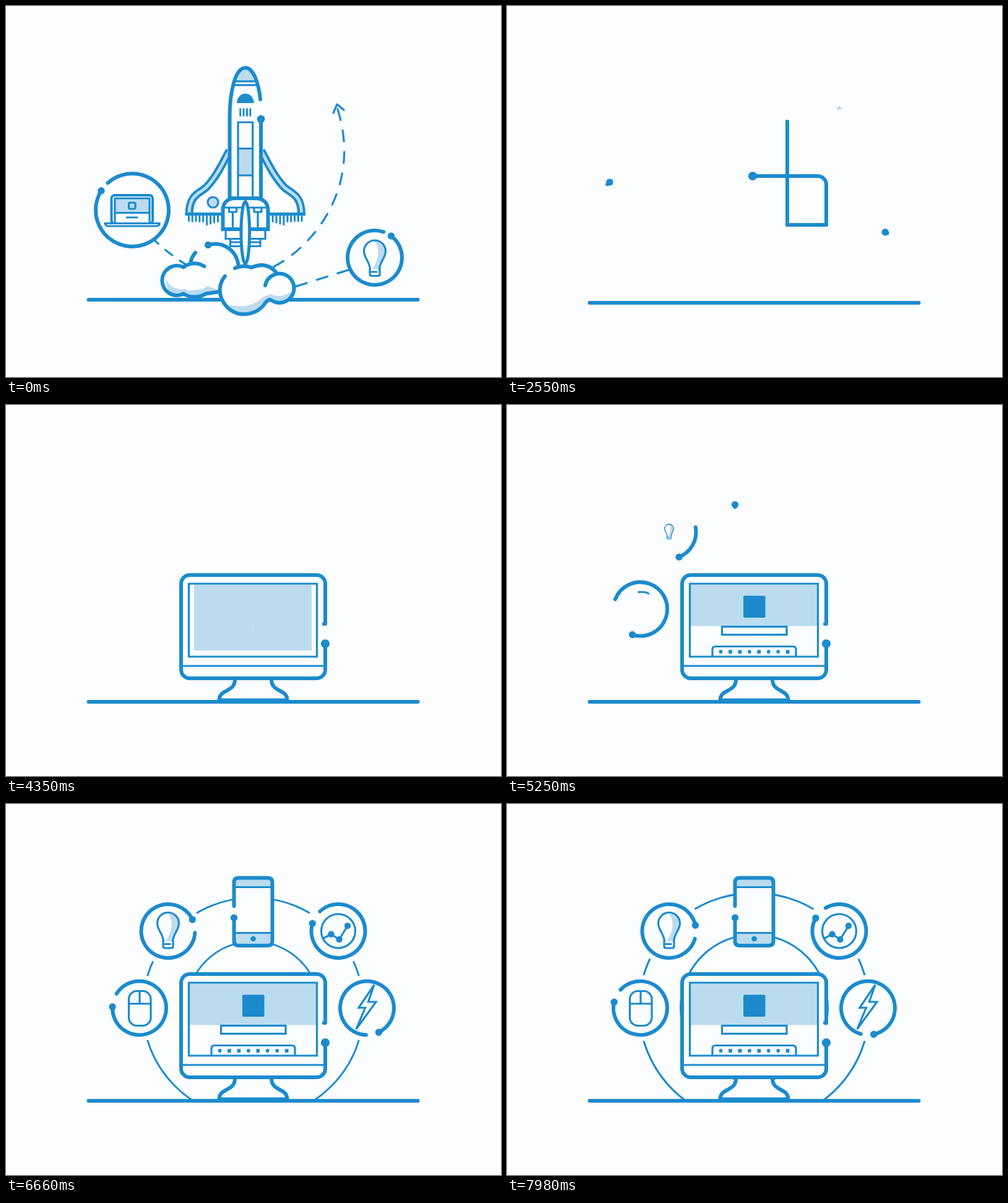
Animation, 800 px wide and 600 px high, one loop 8 s. Source, as an HTML page:

```html
<!DOCTYPE html>
<html lang="en">
<head>
<meta charset="utf-8">
<title>Launch to desktop</title>
<style>
  html, body { margin: 0; width: 100%; height: 100%; overflow: hidden; background: #fcfdff; }
  svg { display: block; width: 100vw; height: 100vh; }
  .k, .t { fill: none; stroke: #1b8bcd; }
  .k { stroke-width: 6; stroke-linecap: round; stroke-linejoin: round; }
  .t { stroke-width: 3.2; }
  .r { stroke-linecap: round; stroke-linejoin: round; }
  .d { fill: #1b8bcd; }
  .l { fill: #bbdcef; }
  .w { fill: #fcfdff; }
</style>
</head>
<body>
<svg viewBox="0 0 800 600">
  <defs>
    <clipPath id="above"><rect width="800" height="479"/></clipPath>
    <g id="bulb">
      <path class="l" d="M0-28Q13-8-4 17L8 17C8 4 17-2 17-12Q17-26 0-28Z"/>
      <path class="t r" d="M-7.5 17C-8.5 4-17.5-1-17.5-12A17.5 17.5 0 0 1 17.5-12C17.5-1 8.5 4 7.5 17"/>
      <path class="t r" d="M-8 16.500V25Q-8 28-5 28H5Q8 28 8 25V16.500M-5 21.500H3"/>
    </g>
    <g id="wing">
      <path class="k" style="stroke-width:13;stroke-linecap:butt" d="M361 234C350 255 340 276 324 293C312 304 296 305 296 338"/>
      <path class="k" style="stroke:#bbdcef;stroke-width:5;stroke-linecap:butt" d="M361 234C350 255 340 276 324 293C312 304 296 305 296 336"/>
      <path class="k" style="stroke-width:5;stroke-linecap:butt" d="M289.500 336.500H352"/>
      <path class="t r" style="stroke-width:3" d="M295.500 338v9.500M301.200 338v10M307 338v9.500M312.800 338v10.500M318.600 338v10.500M324.600 338v15.500M330.500 338v14M336.500 338v12M342.500 338v10.500"/>
    </g>
  </defs>

  <g id="arcs" clip-path="url(#above)">
    <circle id="outer" class="t" cx="399.500" cy="330"/>
    <circle id="inner" class="t" cx="399.500" cy="330"/>
    <circle class="w" cx="262" cy="205.500" r="54.500"/>
    <circle class="w" cx="215.500" cy="330" r="53.500"/>
    <circle class="w" cx="537" cy="205.500" r="54.500"/>
    <circle class="w" cx="583.500" cy="330" r="53.500"/>
  </g>
  <path id="ground" class="k" d="M133.500 0H665.500"/>

  <g id="launch">
    <path id="dashA" class="t r" d="M536 167C575 290 500 388 430 423"/>
    <path id="tip" class="t r" d="M529 173L535 159L546 168"/>
    <path id="dashL" class="t r" d="M239 378Q262 400 292 419"/>
    <path id="dashB" class="t r" d="M553 427L467 454"/>
    <g id="laptop">
      <rect class="t" style="stroke-width:4" x="170.500" y="306" width="66.500" height="46" rx="5"/>
      <rect class="l" x="176" y="311" width="56" height="23"/>
      <path class="t" d="M176 351V311H232V351M176 334.500H232M194 342H213"/>
      <rect class="t" x="198.500" y="318" width="10.500" height="10" rx="2"/>
      <path class="t w" style="fill:#fcfdff" d="M160 351.500H248V353Q247 356 243 356H165Q161 356 160 351.500Z"/>
    </g>
    <g id="bulbA"><use href="#bulb" x="596" y="408.500"/></g>
    <g id="wings">
      <use href="#wing"/>
      <use href="#wing" transform="translate(773.500 0) scale(-1 1)"/>
      <circle class="t" style="fill:#bbdcef" cx="334.500" cy="317.500" r="8.500"/>
    </g>
    <path id="hull" class="w" d="M411 151C408 122 399 100 387 100C370 100 361.500 140 361.500 180V311H412V183Z"/>
    <g id="deck">
      <path class="l" d="M373 121C376 110 381 103 387 103C393 103 398 110 401 121Z"/>
      <path class="t" d="M370 121.800H403M369 127.800H405"/>
      <path class="d" d="M373 157A13.900 15.300 0 0 1 400.800 157Z"/>
      <path class="t" style="stroke-width:2.900" d="M378.700 165.500v13M384 165.500v13M389.500 165.500v13M394.800 165.500v13"/>
      <rect class="l" x="375" y="230" width="24" height="44"/>
      <path class="t" d="M375 311V188H398.700V311M375 230.500H398.700M375 274H398.700"/>
    </g>
    <path id="body" class="k" pathLength="1" d="M411 151C408 122 399 100 387 100C370 100 361.500 140 361.500 180V311H412V183"/>
    <g id="engine">
      <path class="t" style="fill:#fcfdff" d="M355 360H419V376.500H355ZM362.500 376.500H411V388.500H362.500ZM362.500 382H411"/>
      <path class="k" style="fill:#fcfdff;stroke-linejoin:miter" d="M350.500 361V331C350.500 317 359 311 371 311H402C415 311 423.500 317 423.500 331V361Z"/>
      <path class="t" d="M353 326H420M360.500 326V333H372.500V326M366.500 333V360M401 326V333H413V326M407 333V360"/>
      <ellipse class="k" style="fill:#fcfdff;stroke-width:5" cx="386.800" cy="366.500" rx="6.800" ry="50"/>
    </g>
    <g id="cloudL">
      <path class="w" d="M298 415Q310 382 337 384Q372 386 376 424L376 460H330Q305 476 287 465A24 24 0 1 1 287 422Z"/>
      <path class="l" d="M258 441Q266 460 290 458Q296 462 305 459Q318 459 326 453L345 460Q328 464 323 467Q305 474 287 465Q258 470 258 441Z"/>
      <path class="k" d="M306 399Q300 406 298.500 414M327 386.500C350 380 374 394 376 423M287 422.500A24 24 0 1 0 287 465.500M287 422Q304 411 320.500 421M287 465.500Q304 476 324 465Q332 464 345 462"/>
      <circle class="d" cx="326.700" cy="386.500" r="5.700"/>
    </g>
    <g id="cloudR">
      <path class="w" d="M354 437Q370 415 397 423Q424 411 438 433A24 24 0 1 1 424 476Q410 498 384 498A38 38 0 0 1 354 437Z"/>
      <path class="l" d="M353 482Q395 493 416 470L428 466Q444 474 463 461Q458 478 441 479Q428 478 422 476Q412 496 384 497Q366 496 353 482Z"/>
      <path class="k" d="M354 437C333 462 355 498.500 384 498.500Q408 498 420 479Q425 473 430 476.500A23.500 23.500 0 1 0 419 452M370 424Q384 418 396.500 423Q422 412 437.500 432"/>
    </g>
  </g>

  <g id="desk">
    <rect id="back" class="w" x="283" y="275" width="233" height="167" rx="14"/>
    <g id="stand">
      <path class="k" style="fill:#fcfdff" d="M370 444C370 465 344.500 459 344.500 477.500H454.500C454.500 459 429 465 429 444"/>
    </g>
    <path id="chin" class="t" d="M284 422H515"/>
    <rect id="shade" class="l" y="290.500"/>
    <path id="screen" class="t" pathLength="1" d="M295.500 289H502.500V407H295.500Z"/>
    <rect id="badge" class="d" x="382" y="308.500" width="35.500" height="35.500" rx="2"/>
    <rect id="field" class="t" style="fill:#fcfdff" x="347.500" y="358.500" width="104.500" height="13"/>
    <g id="dock">
      <path class="t" d="M332 407V395.500Q332 390.500 337 390.500H462Q467 390.500 467 395.500V407"/>
    </g>
    <path id="frame" class="k" pathLength="1"/>
    <circle id="runner" class="d" r="7"/>
  </g>

  <g id="icons">
    <g id="bulbB"><use href="#bulb" x="262" y="205"/></g>
    <rect id="mouse" class="t" pathLength="1" x="198.500" y="302.500" width="35.500" height="56" rx="13"/>
    <path id="mouseH" class="t" d="M198.500 323H234"/>
    <path id="mouseV" class="t" d="M216 323V303"/>
    <circle id="dial" class="t" pathLength="1" cx="537" cy="205.500" r="27.500"/>
    <path id="trend" class="t" pathLength="1" d="M513.500 217L525.500 210.500L538.500 219L552 197"/>
    <g id="marks"></g>
    <path id="bolt" class="t" pathLength="1" d="M566 364L580.500 329.500H570L595 292.500L585.500 320H598Z"/>
    <g id="phone">
      <rect class="w" x="368.500" y="119.500" width="62" height="109.500" rx="8"/>
      <rect id="capT" class="l" x="371" y="122" width="57" height="12"/>
      <path id="lineT" class="t" d="M371 134.500H428"/>
      <rect id="capB" class="l" x="371" y="209" width="57" height="18"/>
      <path id="lineB" class="t" d="M371 208.500H428"/>
      <circle id="home" class="d" cx="399.500" cy="218" r="4.300"/>
      <path id="case" class="k" pathLength="1" d="M368.500 165V127Q368.500 119.500 376 119.500H423Q430.500 119.500 430.500 127V221.500Q430.500 229 423 229H376Q368.500 229 368.500 221.500V184"/>
      <circle id="caseDot" class="d" r="5.700"/>
    </g>
  </g>
  <g id="rings"></g>
</svg>
<script>
const LOOP = 8000, NS = 'http://www.w3.org/2000/svg';
const $ = {};
document.querySelectorAll('[id]').forEach(e => $[e.id] = e);

const clamp = x => Math.max(0, Math.min(1, x));
const cubic = x => x < .5 ? 4 * x ** 3 : 1 - 4 * (1 - x) ** 3;
const sine = x => (1 - Math.cos(Math.PI * x)) / 2;
const backIn = x => x * x * (2.7 * x - 1.7);
const backOut = x => 1 - backIn(1 - x);
const run = (t, start, span, ease = cubic) => ease(clamp((t - start) / span));
const mix = (a, b, p) => a + (b - a) * p;
const elastic = (s, k, period) => s <= 0 ? 0 : 1 - Math.exp(-k * s) * Math.cos(2 * Math.PI * s / period);

function set(e, attrs) {
  for (const k in attrs) e.setAttribute(k, attrs[k]);
  return e;
}
function add(parent, tag, attrs) {
  return parent.appendChild(set(document.createElementNS(NS, tag), attrs));
}
function show(e, on) { e.style.display = on ? '' : 'none'; }
function scale(e, x, y, sx, sy = sx) {
  show(e, sx > .002 && sy > .002);
  set(e, { transform: `translate(${x} ${y}) scale(${sx} ${sy}) translate(${-x} ${-y})` });
}
function trim(e, a, b) {
  show(e, b - a > .0005);
  set(e, { 'stroke-dasharray': b - a > .9995 ? 'none' : `${b - a} 2`, 'stroke-dashoffset': -a });
}
function follow(dot, path, p) {
  const q = path.getPointAtLength(path.getTotalLength() * p);
  set(dot, { cx: q.x, cy: q.y });
}
// Dashes along the first part of a path only.
function dashes(e, len, on, off, first = on) {
  const list = [];
  for (let at = 0, d = first; at < len; at += d + off, d = on) list.push(Math.min(d, len - at), off);
  list.push(0.01, 2000);
  list.splice(-3, 2);
  show(e, len > .5);
  set(e, { 'stroke-dasharray': list.join(' ') + (list.length % 2 ? ' 2000' : '') });
}

function makeRing(x, y, r, dir = 1) {
  const arc = add($.rings, 'path', { class: 'k' });
  const dot = add($.rings, 'circle', { class: 'd' });
  return (head, sweep, size) => {
    const at = deg => [x + r * Math.cos(deg * Math.PI / 180), y + r * Math.sin(deg * Math.PI / 180)];
    const a = at(head - dir * sweep), b = at(head);
    show(arc, sweep > .2);
    show(dot, size > .01);
    set(arc, { d: `M${a}A${r} ${r} 0 ${sweep > 180 ? 1 : 0} ${dir > 0 ? 1 : 0} ${b}` });
    set(dot, { cx: b[0], cy: b[1], r: 5.7 * size });
  };
}
const laptopRing = makeRing(204, 330, 59);
const lampRing = makeRing(596, 407, 44, -1);

// Tail angle at 5970 ms, degrees per second, gap, start.
const builds = [
  [215.5, 330, 207, 7.8, 29.7, 4680],
  [262, 205.5, -3.3, 9.8, 28.8, 4900],
  [537, 205.5, 220.3, 9.5, 30.5, 5246],
  [583.5, 330, 85.2, 10.2, 28, 5313]
].map(([x, y, tail, rate, gap, start]) => {
  const draw = makeRing(x, y, 43.5);
  return t => {
    const sweep = (360 - gap) * run(t, start, 900);
    draw(tail + rate * (t - 5970) / 1000 + sweep, sweep, run(t, start, 150));
  };
});

[...'ossososs'].forEach((_, i) => {
  const x = 345.5 + i * 15.45;
  if ('oSSoSooS'[i] === 'o') add($.dock, 'circle', { class: 'd', cx: x, cy: 399, r: 2.9 });
  else add($.dock, 'rect', { class: 'd', x: x - 2.9, y: 396.2, width: 5.8, height: 5.8 });
});
const marks = [[525.5, 210.5], [538.5, 219], [552, 197]].map(([x, y]) =>
  [x, y, add($.marks, 'circle', { class: 'd', cx: x, cy: y, r: 5.2 })]);

function drawLaunch(t) {
  const on = t < 2900;
  show($.launch, on);
  const left = 1 - run(t, 1788, 900), dotSize = 1 - run(t, 2620, 220);
  laptopRing(212 + 7 * t / 1000, 344 * left, on ? dotSize : 0);
  lampRing(-53 - 6.6 * t / 1000, 342 * left, on ? dotSize : 0);
  if (!on) return;

  const out = (start, span) => 1 - run(t, start, span, backIn);
  const fade = 1 - run(t, 1680, 720);
  dashes($.dashA, 303 * fade, 18, 17);
  dashes($.dashL, 67 * fade, 14, 15, 10);
  dashes($.dashB, 90 * fade, 18, 17);
  scale($.tip, 537.5, 165.5, 1 - run(t, 2150, 700));
  scale($.laptop, 204, 330, out(1660, 700));
  scale($.bulbA, 596, 407, out(1660, 700));
  scale($.wings, 386.7, 300, 1 - run(t, 1700, 420), 1);
  scale($.deck, 386.7, 210, 1, 1 - run(t, 1680, 420));
  scale($.engine, 386.7, 350, out(1750, 500));
  show($.hull, t < 1900);
  trim($.body, run(t, 1680, 400), 1);
  const swell = 1 + .008 * t / 1440;
  scale($.cloudL, 330, 440, swell * out(1500, 650));
  scale($.cloudR, 400, 450, swell * out(1460, 720));
}

function drawDesk(t) {
  const shift = run(t, 2060, 370), x = mix(412, 453, shift);
  set($.frame, { d: `M${x} 183V${mix(311, 354, shift)}H516V289A14 14 0 0 0 502 275H297A14 14 0 0 0 283 289V428A14 14 0 0 0 297 442H502A14 14 0 0 0 516 428V386` });
  const head = run(t, 2060, 1070, sine), len = $.frame.getTotalLength();
  trim($.frame, (len - 746) / len * run(t, 2500, 630, sine), head);
  follow($.runner, $.frame, head);
  set($.runner, { r: mix(6.4, 7.1, shift) });
  show($.back, t > 3200);
  scale($.chin, 399.5, 422, run(t, 2900, 330), 1);
  scale($.stand, 399.5, 444, 1, run(t, 3450, 500));
  trim($.screen, 0, run(t, 3270, 700));

  const grow = run(t, 3980, 500), w = 204 * grow;
  const h = mix(108, 67, run(t, 4250, 500));
  show($.shade, w > .5);
  set($.shade, { x: 399 - w / 2, width: w, height: h });
  scale($.badge, 399.7, 326.2, run(t, 4315, 420, backOut) < 0 ? 0 : run(t, 4325, 420));
  scale($.field, 399.7, 365, run(t, 4315, 450), 1);
  scale($.dock, 399.5, 407, 1, run(t, 4620, 500, backOut));
}

function drawIcons(t) {
  const s = t / 1000;
  const o = elastic(s - 5.768, 3.16, 1.02), i = elastic(s - 5.807, 2.14, 1);
  show($.arcs, t > 5768);
  set($.outer, { r: 186.5 * Math.max(0, o) });
  set($.inner, { r: 119.5 * Math.max(0, i) });
  $.outer.style.strokeWidth = 3.1 * Math.min(1, o);
  $.inner.style.strokeWidth = 3.1 * Math.min(1, Math.max(0, i));

  builds.forEach(draw => draw(t));
  scale($.bulbB, 262, 205, run(t, 5200, 500, backOut));
  trim($.mouse, 0, run(t, 5050, 650));
  scale($.mouseH, 218, 323, run(t, 5600, 400), 1);
  scale($.mouseV, 216, 323, 1, run(t, 5880, 350));
  trim($.dial, 0, run(t, 5350, 550));
  trim($.trend, 0, run(t, 5740, 560));
  marks.forEach(([x, y, e], n) => scale(e, x, y, run(t, 5800 + n * 150, 180)));
  const cut = .5 * (1 - run(t, 5560, 780));
  trim($.bolt, cut, 1 - cut);

  const edge = run(t, 5106, 1000);
  show($.phone, t > 5106);
  trim($.case, 0, edge);
  follow($.caseDot, $.case, edge);
  scale($.capT, 399.5, 128, 1, run(t, 5620, 330));
  scale($.lineT, 399.5, 134.5, run(t, 5760, 410), 1);
  scale($.capB, 399.5, 227, run(t, 5810, 420), 1);
  scale($.lineB, 399.5, 208.5, run(t, 5880, 400), 1);
  scale($.home, 399.5, 218, run(t, 6050, 300, backOut));
}

function render(t) {
  set($.ground, { transform: `translate(0 ${mix(475, 480, run(t, 1700, 700))})` });
  drawLaunch(t);
  drawDesk(t);
  drawIcons(t);
  // The dot belongs to the rocket hull until the monitor line takes over.
  show($.icons, t > 4600);
}

const begin = performance.now();
function tick() {
  render((performance.now() - begin) % LOOP);
  requestAnimationFrame(tick);
}
render(0);
requestAnimationFrame(tick);
</script>
</body>
</html>
```
